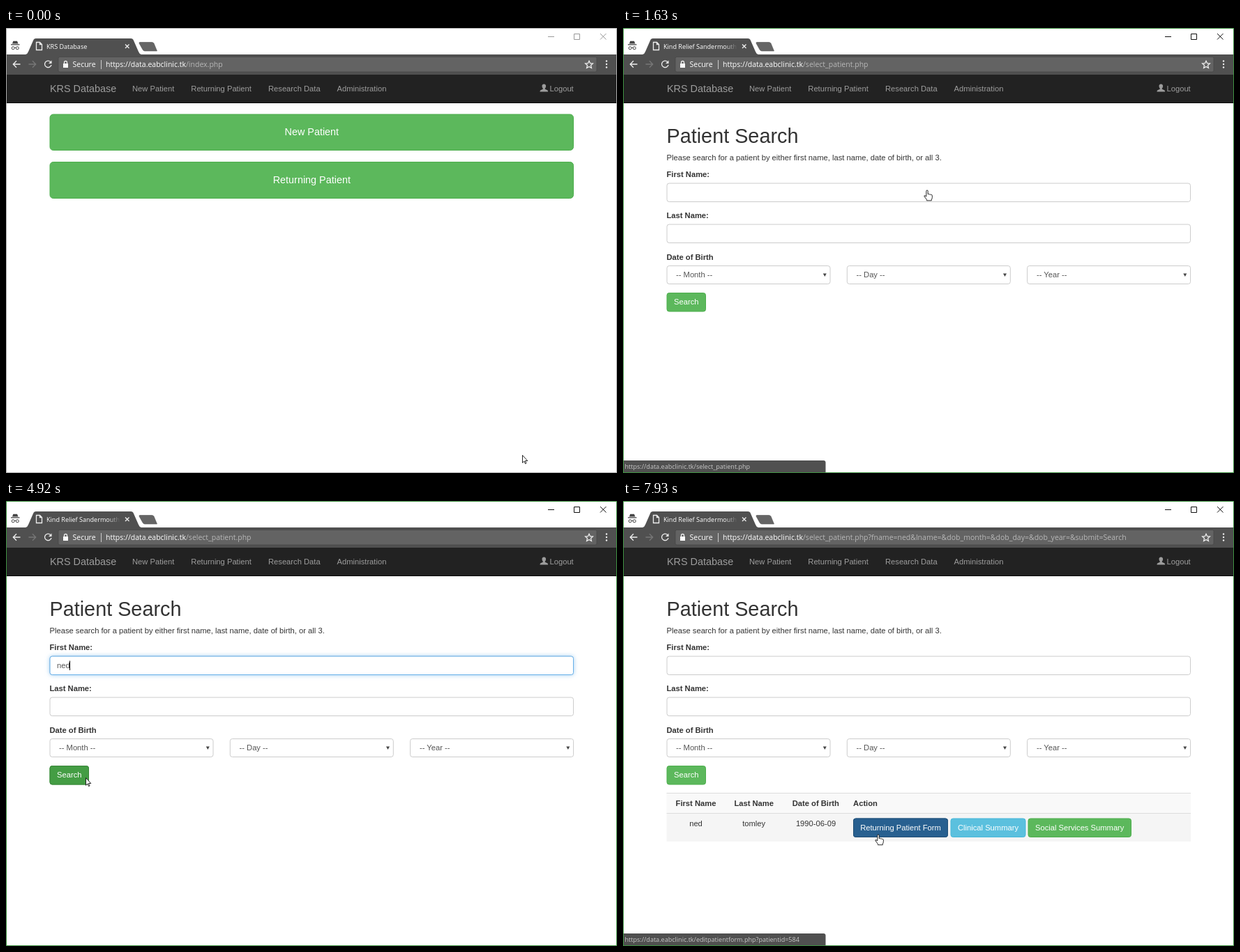
Animation of 876x639 px, one loop 8000 ms. Source, as an HTML page:

```html
<!DOCTYPE html>
<html lang="en">
<head>
<meta charset="utf-8">
<title>Patient search</title>
<style>
  html, body { margin: 0; width: 100%; height: 100%; overflow: hidden; background: #fff; }
  svg { display: block; width: 876px; height: 639px; }
  text { font: 11.2px "Liberation Sans", Arial, sans-serif; fill: #333; }
  .line { fill: none; stroke: #eee; stroke-width: 1.3; }
  .tab, .status text { font: 9.05px "Open Sans", "Noto Sans", sans-serif; fill: #fff; }
  .url text { font: 10.5px "Open Sans", "Noto Sans", sans-serif; fill: #fff; }
  .url .path { fill: #b8b8b8; }
  .nav text { fill: #9d9d9d; }
  .nav .brand, .big text { font-size: 14.4px; }
  .mid { text-anchor: middle; }
  .bold text { font-weight: bold; }
  .btn text { fill: #fff; }
  .btn rect { rx: 3.2px; }
  .big rect { rx: 4.8px; }
  .green { fill: #5cb85c; stroke: #4cae4c; }
  .over { fill: #449d44; stroke: #398439; }
  .press { fill: #398439; stroke: #255625; }
  .blue { fill: #337ab7; stroke: #2e6da4; }
  .blue-over { fill: #286090; stroke: #204d74; }
  .sky { fill: #5bc0de; stroke: #46b8da; }
  .field { fill: #fff; stroke: #ccc; rx: 3.2px; }
  .glow { stroke: #66afe9; filter: drop-shadow(0 0 3px rgba(102, 175, 233, .6)); }
  .value text { fill: #555; }
  .status rect { fill: #505050; }
  .status text { fill: #c8c8c8; }
  .edge { fill: none; }
</style>
</head>
<body>
<svg viewBox="0 0 876 639">
  <defs>
    <linearGradient id="fade" gradientUnits="userSpaceOnUse" x1="146" x2="164" y1="0" y2="0">
      <stop stop-color="#fff"/><stop offset="1" stop-color="#505050"/>
    </linearGradient>
    <g id="window">
      <rect class="edge" x=".5" y=".5" width="875" height="638"/>
    </g>
    <path id="controls" fill="none" d="M777 12.5h9M814.500 8.500h8v8h-8zM852 8l8.500 8.500M860.500 8l-8.500 8.500"/>
    <path id="chevron" fill="#444" d="M-2.500-2h5L0 2.500Z"/>
  </defs>
  <rect width="876" height="639" fill="#fff"/>

  <!-- browser frame -->
  <path fill="#505050" d="M0 38H28Q31 37 32 34L39 18Q40 15 43 15H179Q182 15 183 18L190 34Q191 37 194 38H876V67H0Z"/>
  <path fill="#656565" stroke="#555" stroke-width=".6" d="M192 20.500H209Q211 20.500 212 22L216.500 33H199Q197 33 196 31L191 22Q190.500 20.500 192 20.500Z"/>
  <g fill="#444">
    <path d="M7 24.500h12.500v-1.200H7ZM9 22.500 10.300 18.800h5.700L17.500 22.500Z"/>
    <path fill="none" stroke="#444" d="M12 28.500q1.300-1 2.500 0"/>
    <circle cx="10.200" cy="28.800" r="2" fill="none" stroke="#444"/>
    <circle cx="16.300" cy="28.800" r="2" fill="none" stroke="#444"/>
  </g>
  <path class="line" stroke-width="1" data-on="0 1500 1580 5830 6070 8000" d="M43.500 20.500h5l3 3v8h-8zM48.500 20.500v3h3"/>
  <text class="tab" x="58" y="29.500" data-on="0 1580">KRS Database</text>
  <text class="tab" x="58" y="29.500" style="fill:url(#fade)" data-on="1580 8000">Kind Relief Sandermouth</text>
  <path class="line" stroke-width="1" d="M171 23.500l5.500 5.500M176.500 23.500l-5.500 5.500"/>

  <rect x="75" y="41.500" width="772" height="21.500" rx="2" fill="#636363" stroke="#474747" stroke-width=".8"/>
  <path class="line" d="M20.500 52H10.500M15 47.300 10.300 52 15 56.700"/>
  <path class="line" style="stroke:#777" d="M32.500 52h10M38 47.300 42.700 52 38 56.700"/>
  <g data-on="0 1500 1580 5830 6070 8000">
    <path class="line" d="M63.800 48.500A4.800 4.800 0 1 0 65 53"/>
    <path fill="#eee" d="M65.500 46.500V51H61Z"/>
  </g>
  <path class="line" data-on="1500 1580 5830 6070" d="M56 47.500l9 9M65 47.500l-9 9"/>
  <path fill="#fff" d="M82 51h7v6h-7z"/>
  <path class="line" d="M83.500 51v-1.500a2 2 0 0 1 4 0V51"/>
  <path d="M136.500 46v13" stroke="#ccc"/>
  <path class="line" d="M836 47.200l1.600 3.500 3.800.4-2.900 2.500.9 3.800-3.400-2-3.400 2 .9-3.800-2.900-2.500 3.800-.4Z"/>
  <g fill="#eee"><circle cx="861" cy="47.500" r="1.200"/><circle cx="861" cy="52" r="1.200"/><circle cx="861" cy="56.500" r="1.200"/></g>
  <g class="url">
    <text x="95.500" y="56">Secure</text>
    <text x="143" y="56" data-on="0 1580">https://data.eabclinic.tk<tspan class="path">/index.php</tspan></text>
    <text x="143" y="56" data-on="1580 6070">https://data.eabclinic.tk<tspan class="path">/select_patient.php</tspan></text>
    <text x="143" y="56" data-on="6070 8000">https://data.eabclinic.tk<tspan class="path">/select_patient.php?fname=ned&amp;lname=&amp;dob_month=&amp;dob_day=&amp;dob_year=&amp;submit=Search</tspan></text>
  </g>

  <!-- site navigation -->
  <rect y="67" width="876" height="41" fill="#222"/>
  <rect y="107" width="876" height="1" fill="#080808"/>
  <g class="nav">
    <text class="brand" x="63" y="92">KRS Database</text>
    <text x="181" y="90.500">New Patient</text>
    <text x="265.300" y="90.500">Returning Patient</text>
    <text x="376" y="90.500">Research Data</text>
    <text x="474.500" y="90.500">Administration</text>
    <text x="779.500" y="90.500">Logout</text>
    <path fill="#9d9d9d" d="M771.300 80.500c2 0 3 1.500 2.800 3.300-.1 1.300-.6 2.300-1.300 3v1l3.300 1.400q1 .5 1 2.300H765.500q0-1.800 1-2.300l3.300-1.400v-1c-.7-.7-1.200-1.700-1.300-3-.2-1.800.8-3.300 2.800-3.300Z"/>
  </g>

  <!-- start page -->
  <g class="btn big mid" data-on="0 1580">
    <rect class="green" x="63" y="124" width="750.500" height="51.500"/>
    <text x="438.300" y="154">New Patient</text>
    <rect class="green" x="63" y="192.500" width="750.500" height="52"/>
    <rect class="over" x="63" y="192.500" width="750.500" height="52" data-on="920 1370"/>
    <rect class="press" x="63" y="192.500" width="750.500" height="52" data-on="1370 1580"/>
    <text x="438.300" y="222.500">Returning Patient</text>
  </g>

  <!-- search page -->
  <g data-on="1580 8000">
    <text x="62.500" y="165" style="font-size:28.800px">Patient Search</text>
    <text x="62.500" y="190">Please search for a patient by either first name, last name, date of birth, or all 3.</text>
    <g class="bold">
      <text x="62.500" y="214">First Name:</text>
      <text x="62.500" y="273">Last Name:</text>
      <text x="62.500" y="332.500">Date of Birth</text>
    </g>
    <rect class="field" x="63" y="223" width="750.500" height="26.500"/>
    <rect class="field glow" x="63" y="223" width="750.500" height="26.500" data-on="1990 5740" data-fade="150"/>
    <rect class="field" x="63" y="282" width="750.500" height="26.500"/>
    <g class="value">
      <text x="73" y="240" data-on="3320 3520">n</text>
      <text x="73" y="240" data-on="3520 3720">ne</text>
      <text x="73" y="240" data-on="3720 6070">ned</text>
      <rect class="field" x="63" y="341.500" width="234" height="26"/>
      <rect class="field" x="321.300" y="341.500" width="234" height="26"/>
      <rect class="field" x="579.600" y="341.500" width="234" height="26"/>
      <text x="76" y="358.300">-- Month --</text>
      <text x="334.500" y="358.300">-- Day --</text>
      <text x="593" y="358.300">-- Year --</text>
      <use href="#chevron" x="289.300" y="354.500"/>
      <use href="#chevron" x="547.500" y="354.500"/>
      <use href="#chevron" x="805.800" y="354.500"/>
    </g>
    <rect x="73" y="229.500" width="1" height="13.500" data-on="1990 2520 3070 3320"/>
    <rect x="79" y="229.500" width="1" height="13.500" data-on="3320 3520"/>
    <rect x="85" y="229.500" width="1" height="13.500" data-on="3520 3720"/>
    <rect x="91" y="229.500" width="1" height="13.500" data-on="3720 4250 4780 5310"/>
    <g class="btn">
      <rect class="green" x="63" y="380.500" width="55.500" height="26.500"/>
      <rect class="over" x="63" y="380.500" width="55.500" height="26.500" data-on="4890 6440"/>
      <rect class="press" x="63" y="380.500" width="55.500" height="26.500" data-on="5740 5830"/>
      <rect x="62.500" y="380" width="56.500" height="27.500" fill="none" stroke="#4590c0" stroke-width="1.300" data-on="5740 6070"/>
      <text x="73" y="397.300">Search</text>
    </g>
  </g>

  <!-- results -->
  <g data-on="6070 8000">
    <rect x="62.500" y="419" width="751.500" height="30" fill="#f9f9f9"/>
    <rect x="62.500" y="419" width="751.500" height="30" fill="#f5f5f5" data-on="6543 6817"/>
    <rect x="62.500" y="449" width="751.500" height="40" fill="#f5f5f5" data-on="6817 8000"/>
    <path d="M62.500 419.500h751.500M62.500 448.500h751.500" stroke="#ddd"/>
    <g class="mid bold">
      <text x="104.500" y="437.500">First Name</text>
      <text x="187.700" y="437.500">Last Name</text>
      <text x="276.300" y="437.500">Date of Birth</text>
      <text x="347.500" y="437.500">Action</text>
    </g>
    <g class="mid">
      <text x="104.500" y="467">ned</text>
      <text x="187.700" y="467">tomley</text>
      <text x="276.500" y="467">1990-06-09</text>
    </g>
    <g class="btn mid">
      <rect class="blue" x="330.500" y="456" width="135" height="26.500"/>
      <rect class="blue-over" x="330.500" y="456" width="135" height="26.500" data-on="7250 8000"/>
      <text x="398" y="472.800">Returning Patient Form</text>
      <rect class="sky" x="470" y="456" width="107" height="26.500"/>
      <text x="523.500" y="472.800">Clinical Summary</text>
      <rect class="green" x="581" y="456" width="147.500" height="26.500"/>
      <text x="654.700" y="472.800">Social Services Summary</text>
    </g>
  </g>

  <!-- link preview -->
  <g class="status" data-on="1400 1880" data-fade="120">
    <rect x="-4" y="621" width="294.500" height="22" rx="3"/>
    <text x="2.500" y="633">https://data.eabclinic.tk/select_patient.php</text>
  </g>
  <g class="status" data-on="7330 8000" data-fade="120">
    <rect x="-4" y="621" width="294.500" height="22" rx="3"/>
    <text x="2.500" y="633">https://data.eabclinic.tk/editpatientform.php?patientid=584</text>
  </g>

  <g data-on="0 1370"><use href="#window" stroke="#aaa"/><use href="#controls" stroke="#999"/></g>
  <g data-on="1370 8000"><use href="#window" stroke="#3c8f3f"/><use href="#controls" stroke="#111"/></g>

  <g id="pointer" stroke-linejoin="round">
    <path data-on="0 920 3655 3795 3923 6620 6720 7250" fill="#fff" stroke="#111" stroke-width=".9" d="M.5.500V11.300L2.900 9 4.500 12.700 6 12 4.400 8.500H7.800Z"/>
    <path data-on="1880 3655 3795 3923 6620 6720" fill="none" stroke="#333" d="M-2.500-4.500h2L0-4 .5-4.500h2M0-4V4M-2.500 4.500h2L0 4l.5.500h2"/>
    <path data-on="920 1880 7250 8000" fill="#fff" stroke="#111" stroke-width=".9" d="M-1.200 9V1.200a1.200 1.200 0 0 1 2.400 0V5.600q2-.6 2.200.4 1.900-.5 2.100.5 1.800-.3 1.800.9V10.600q0 1.400-1 2.600V14.800H-.6V13.400L-4 8.900q-.6-1.600.9-1.200Z"/>
  </g>
</svg>
<script>
  const LOOP = 8000;

  // Pointer stops: time, x, y
  const stops = [
    [0, 740, 613], [40, 740, 613], [840, 445, 283], [920, 441, 246], [1090, 436, 233],
    [1880, 436, 233], [2000, 416, 238], [3600, 416, 238], [3950, 295, 315], [4090, 245, 333],
    [4500, 165, 374], [4920, 114, 397], [5130, 106, 396], [6390, 106, 396], [6650, 173, 435],
    [7160, 322, 468], [7440, 348, 473], [7930, 366, 479], [LOOP, 366, 479]
  ];

  // data-on holds start/end pairs in ms; data-fade softens both ends
  const parts = [...document.querySelectorAll('[data-on]')].map(el => ({
    el,
    spans: el.dataset.on.split(' ').map(Number),
    fade: Number(el.dataset.fade || 1)
  }));
  const pointer = document.getElementById('pointer');

  function level({ spans, fade }, t) {
    let best = 0;
    for (let i = 0; i < spans.length; i += 2) {
      const rise = (t - spans[i] + 1) / fade;
      const fall = (spans[i + 1] + fade - 1 - t) / fade;
      best = Math.max(best, Math.min(1, rise, fall));
    }
    return best;
  }

  function place(t) {
    const i = stops.findIndex(s => s[0] > t);
    const [t0, x0, y0] = stops[i - 1], [t1, x1, y1] = stops[i];
    const k = (t - t0) / (t1 - t0);
    return [x0 + (x1 - x0) * k, y0 + (y1 - y0) * k].map(Math.round);
  }

  function draw(t) {
    for (const part of parts) part.el.style.opacity = level(part, t);
    pointer.setAttribute('transform', `translate(${place(t)})`);
  }

  const start = performance.now();
  function tick() {
    draw(Math.floor(performance.now() - start) % LOOP);
    requestAnimationFrame(tick);
  }
  tick();
</script>
</body>
</html>
```
